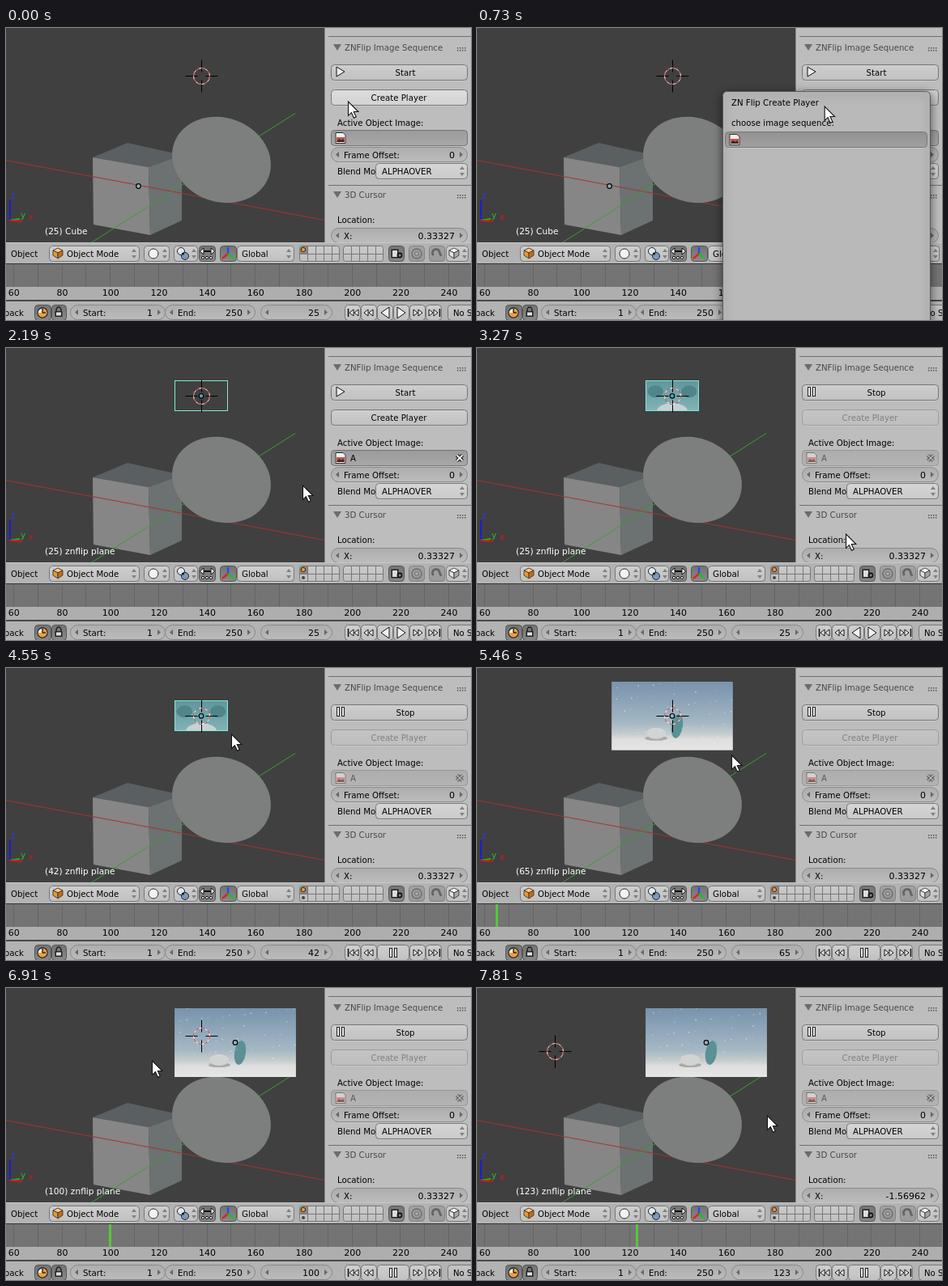
An HTML page with a canvas for the animation above (8000 ms loop, 574x361 px).

```html
<!DOCTYPE html>
<html lang="en">
<head>
<meta charset="utf-8">
<title>Image sequence player</title>
<style>
  html, body { margin: 0; width: 574px; height: 361px; overflow: hidden; background: #404040; }
  canvas { display: block; }
</style>
</head>
<body>
<canvas id="stage" width="574" height="361"></canvas>
<script>
const ctx = document.getElementById('stage').getContext('2d');
const LOOP = 8000, STEPS = 44;
const FONT = '"DejaVu Sans", sans-serif';

// Each key is [step, value, ...]; values in between are linear.
const MOUSE = [[0, 422, 91], [2, 436, 91], [5, 425, 100], [8, 336, 165], [10, 338, 166],
  [12, 366, 170], [15, 440, 56], [16, 442, 55], [18, 455, 230], [20, 477, 340], [21, 478, 342],
  [25, 278, 82], [26, 281, 86], [30, 314, 108], [31, 321, 108], [34, 366, 115], [36, 363, 116],
  [38, 180, 90], [39, 96, 78], [40, 96, 78], [42, 330, 148], [43, 358, 158]];
const FRAME = [[21, 25], [25, 42], [30, 65], [34, 82], [43, 123]];
const SCALE = [[26, 1], [29.5, 2.27]];
const CENTER = [[31, 241, 59.3], [34, 286, 66.5], [36, 283, 67.5]];

function track(keys, s) {
  if (s <= keys[0][0]) return keys[0].slice(1);
  for (let i = 1; i < keys.length; i++) {
    const [a, ...from] = keys[i - 1], [b, ...to] = keys[i];
    if (s <= b) return from.map((v, k) => v + (to[k] - v) * (s - a) / (b - a));
  }
  return keys[keys.length - 1].slice(1);
}

function rect(x, y, w, h, fill) {
  ctx.fillStyle = fill;
  ctx.fillRect(x, y, w, h);
}

function poly(pts, fill, stroke, width = 1) {
  ctx.beginPath();
  for (let i = 0; i < pts.length; i += 2) ctx.lineTo(pts[i], pts[i + 1]);
  ctx.closePath();
  if (fill) { ctx.fillStyle = fill; ctx.fill(); }
  if (stroke) { ctx.strokeStyle = stroke; ctx.lineWidth = width; ctx.stroke(); }
}

function line(x1, y1, x2, y2, color, width = 1) {
  ctx.beginPath();
  ctx.moveTo(x1, y1);
  ctx.lineTo(x2, y2);
  ctx.strokeStyle = color;
  ctx.lineWidth = width;
  ctx.stroke();
}

function oval(x, y, rx, ry, fill, stroke, width = 1, turn = 0) {
  ctx.beginPath();
  ctx.ellipse(x, y, rx, ry, turn, 0, Math.PI * 2);
  if (fill) { ctx.fillStyle = fill; ctx.fill(); }
  if (stroke) { ctx.strokeStyle = stroke; ctx.lineWidth = width; ctx.stroke(); }
}

function text(str, x, y, { color = '#000', align = 'left', size = 10.2 } = {}) {
  ctx.font = size + 'px ' + FONT;
  ctx.textAlign = align;
  ctx.textBaseline = 'alphabetic';
  ctx.fillStyle = color;
  ctx.fillText(str, x, y + 4);
}

const number = (str, x, y, align = 'right') => text(str, x, y, { align, size: 11 });

function box(x, y, w, h, top, bottom = top, r = 4, edge = '#777') {
  const g = ctx.createLinearGradient(0, y, 0, y + h);
  g.addColorStop(0, top);
  g.addColorStop(1, bottom);
  rect(x + r, y + h, w - 2 * r, 1, 'rgba(255,255,255,.2)');
  ctx.beginPath();
  ctx.roundRect(x + 0.5, y + 0.5, w - 1, h - 1, r);
  ctx.fillStyle = g;
  ctx.fill();
  ctx.strokeStyle = edge;
  ctx.lineWidth = 1;
  ctx.stroke();
}

const button = (x, y, w, h = 20, lit) => lit ? box(x, y, w, h, '#dedede', '#d2d2d2') : box(x, y, w, h, '#cfcfcf', '#c0c0c0');
const pressed = (x, y, w, h = 20) => box(x, y, w, h, '#727272', '#8a8a8a', 4, '#555');
const muted = (x, y, w, h = 20) => box(x, y, w, h, '#a2a2a2', '#9a9a9a', 4, '#808080');
const tri = (x, y, w, h, fill, stroke) => poly([x, y - h, x + w, y, x, y + h], fill, stroke);

function updown(x, y) {
  poly([x - 3, y - 2, x, y - 6, x + 3, y - 2], '#808080');
  poly([x - 3, y + 2, x, y + 6, x + 3, y + 2], '#808080');
}

function field(x, y, w, label, value) {
  box(x, y, w, 19, '#adadad', '#bcbcbc', 9, '#8a8a8a');
  tri(x + 10, y + 9.5, -4, 3.5, '#666');
  tri(x + w - 10, y + 9.5, 4, 3.5, '#666');
  text(label, x + 16, y + 9.5);
  number(value, x + w - 16, y + 9.5);
}

function pauseIcon(x, y) {
  for (const dx of [-5, 1]) {
    rect(x + dx, y - 6, 4, 12, '#222');
    rect(x + dx + 1, y - 5, 2, 10, '#eee');
  }
}

function imageIcon(x, y) {
  poly([x - 6, y - 6.5, x + 3, y - 6.5, x + 6, y - 3.5, x + 6, y + 6.5, x - 6, y + 6.5], '#f6f3f0', '#3a2c2c');
  rect(x - 5, y - 1, 10, 6, '#c4554c');
  poly([x - 5, y + 5, x - 2, y + 1, x + 1, y + 3, x + 3, y + 1, x + 5, y + 5], '#33282a');
}

function cubeIcon(x, y, top, left, right) {
  poly([x, y - 6, x + 6, y - 3, x, y, x - 6, y - 3], top, '#444');
  poly([x - 6, y - 3, x, y, x, y + 7, x - 6, y + 3], left, '#444');
  poly([x + 6, y - 3, x, y, x, y + 7, x + 6, y + 3], right, '#444');
}

function film(x, y, w, h, frame) {
  ctx.save();
  ctx.beginPath();
  ctx.rect(x, y, w, h);
  ctx.clip();
  ctx.translate(x, y);
  ctx.scale(w / 150, h / 85);
  const g = ctx.createLinearGradient(0, 0, 0, 85);
  if (frame < 55) {
    g.addColorStop(0, '#5e979d');
    g.addColorStop(1, '#83b3b7');
    rect(0, 0, 150, 85, g);
    oval(28, 30, 22, 17, '#4f858b');
    oval(122, 30, 22, 17, '#4f858b');
    oval(75, 88, 44, 26, '#c6d2d4');
  } else {
    g.addColorStop(0, '#7893ae');
    g.addColorStop(0.6, '#a4b7c3');
    g.addColorStop(0.76, '#c5cccd');
    g.addColorStop(0.84, '#dedede');
    g.addColorStop(1, '#e6e6e5');
    rect(0, 0, 150, 85, g);
    oval(55, 70, 14, 3, '#aaa9a7');
    oval(55, 64, 12, 7, '#d2d4d3');
    oval(81, 55, 7, 15, '#5b9097', null, 1, 0.15);
    for (let i = 0; i < 45; i++) {
      const sx = (i * 61.8 + frame * 0.5) % 150, sy = (i * 37.3 + frame * 1.4) % 72;
      oval(sx, sy, 0.5 + i % 3 * 0.2, 0.5 + i % 3 * 0.2, 'rgba(235,241,245,.55)');
    }
  }
  ctx.restore();
}

function cursor3d(x, y) {
  for (const [dx, dy] of [[1, 0], [-1, 0], [0, 1], [0, -1]])
    line(x + dx * 5, y + dy * 5, x + dx * 20, y + dy * 20, '#000');
  oval(x, y, 10, 10, null, '#f4f4f4');
  ctx.setLineDash([3.93, 3.93]);
  oval(x, y, 10, 10, null, '#e21f1f');
  ctx.setLineDash([]);
}

function viewport(s, frame) {
  rect(0, 0, 393, 265, '#404040');
  poly([107, 160, 150, 142, 217, 157, 176, 172], '#5a6061');
  poly([107, 160, 176, 172, 178, 256, 108, 243], '#868686');
  poly([176, 172, 217, 157, 217, 238, 178, 256], '#6c7171');
  line(0, 163.5, 393, 237.5, '#a83232');
  line(105, 265.5, 357, 105.5, '#38a038');
  oval(266, 163, 62, 52, '#7d7f7f', null, 1, 0.35);

  const made = s >= 11, started = s >= 16;
  const [cx, cy] = track(CENTER, s), [k] = track(SCALE, s);
  const w = 66 * k, h = 37.5 * k;
  if (started) film(cx - w / 2, cy - h / 2, w, h, frame);
  if (made && s < 30) {
    ctx.strokeStyle = '#84e8d4';
    ctx.lineWidth = 1;
    ctx.strokeRect(Math.round(cx - w / 2) + 0.5, Math.round(cy - h / 2) - 0.5, w - 1, Math.round(h) - 1);
  }
  s < 40 ? cursor3d(241.5, 59.5) : cursor3d(96.5, 78.5);
  if (made) oval(cx, cy, 2.8, 2.8, s < 25 ? '#5f9da3' : null, '#000', 1.2);
  else oval(163.5, 195.5, 2.8, 2.8, '#87b7ba', '#000', 1.2);

  line(5, 238, 5, 213, '#1c1cd8', 2);
  line(4, 238, 17, 236, '#22b522', 2);
  line(4, 238, 20, 239, '#d01818', 2);
  text('z', 6, 207, { color: '#3333ff' });
  text('y', 18, 231, { color: '#24c424' });
  text('x', 28, 233, { color: '#d01818' });
  text(`(${frame}) ${made ? 'znflip plane' : 'Cube'}`, 48, 251, { color: '#fff', size: 10.6 });
}

function title(str, y) {
  poly([404, y - 4, 414, y - 4, 409, y + 4], '#6c6c6c');
  text(str, 418, y, { color: '#484848' });
  for (let i = 0; i < 4; i++) {
    rect(557 + i * 3, y, 1.5, 1.5, '#555');
    rect(557 + i * 3, y + 3, 1.5, 1.5, '#555');
  }
}

function panel(s, mx, my) {
  const on = s >= 16, dim = on ? '#808080' : '#000';
  const over = y => mx > 401 && my >= y && my < y + 20;
  rect(393, 0, 181, 265, '#bdbdbd');
  rect(393, 0, 1, 265, '#8d8d8d');
  rect(398, 10, 176, 1, '#6e6e6e');
  title('ZNFlip Image Sequence', 24);

  button(401, 45, 169, 20, over(45));
  on ? pauseIcon(413, 54) : tri(408, 54, 10, 6, '#eee', '#111');
  text(on ? 'Stop' : 'Start', 493, 55, { align: 'center' });
  on ? box(401, 76, 169, 20, '#c4c4c4', '#bebebe', 4, '#9c9c9c') : button(401, 76, 169, 20, s < 4 && over(76));
  text('Create Player', 485, 86, { align: 'center', color: dim });

  text('Active Object Image:', 409, 117);
  box(401, 126, 169, 20, on ? '#adadad' : '#9a9a9a', on ? '#b4b4b4' : '#a9a9a9', 4, on ? '#969696' : '#747474');
  ctx.globalAlpha = on ? 0.5 : 1;
  imageIcon(413, 136);
  if (s >= 11) {
    text('A', 425, 136);
    for (const [color, width] of [['#222', 4.5], ['#eee', 1.8]]) {
      line(556.5, 132.5, 563.5, 139.5, color, width);
      line(563.5, 132.5, 556.5, 139.5, color, width);
    }
  }
  ctx.globalAlpha = 1;
  field(401, 147, 169, 'Frame Offset:', '0');
  text('Blend Mo', 409, 177);
  box(456, 167, 114, 20, '#d6d6d6', '#cacaca');
  text('ALPHAOVER', 464, 177);
  updown(563, 177);

  rect(398, 194, 176, 1, '#6e6e6e');
  title('3D Cursor', 206);
  text('Location:', 409, 237);
  ctx.save();
  ctx.beginPath();
  ctx.rect(393, 240, 181, 25);
  ctx.clip();
  field(401, 247, 169, 'X:', s >= 40 ? '-1.56962' : '0.33327');
  ctx.restore();
}

function header(s) {
  rect(0, 265, 574, 27, '#b3b3b3');
  rect(0, 265, 574, 1, '#c8c8c8');
  if (s > 26 && s < 30) {
    const k = track(SCALE, s)[0].toFixed(4);
    return text(`${k} Y: ${k} Z: ${k}`, 0, 279, { size: 10.6 });
  }
  if (s > 31 && s < 36) {
    const [x, y] = track(CENTER, s), d = Math.hypot(x - 241, y - 59.3);
    const digits = String(Math.round(d * 25.5)).padStart(4, '0');
    return text(`${digits} (${(d * 0.01549).toFixed(4)})`, 0, 279, { size: 10.6 });
  }
  text('Object', 6, 279);
  button(53, 269, 112);
  cubeIcon(64, 278, '#ffc681', '#ef962e', '#c56c13');
  text('Object Mode', 75, 279);
  updown(158, 279);

  button(170, 269, 32);
  oval(182, 279, 6, 6, '#f3f3f3', '#333');
  updown(196, 279);

  button(207, 269, 30);
  oval(216, 276, 4.5, 4.5, '#dfe8f3', '#222');
  oval(221, 282, 4.5, 4.5, '#7b9ac2', '#222');
  oval(218.5, 279, 1.5, 1.5, '#111');
  updown(232, 279);

  pressed(238, 269, 21);
  line(242, 276, 255, 276, '#111', 2);
  poly([244, 272, 239.5, 276, 244, 280], '#fff', '#111');
  poly([253, 272, 257.5, 276, 253, 280], '#fff', '#111');
  for (const x of [243, 248, 253]) oval(x, 284, 1.6, 1.6, '#fff', '#111');

  pressed(264, 269, 21);
  line(274, 279, 274, 271, '#2a4bea', 2.4);
  line(274, 279, 267, 285, '#d22', 2.4);
  line(274, 279, 281, 285, '#2b2', 2.4);
  button(285, 269, 71);
  text('Global', 291, 279);
  updown(349, 279);

  for (const x of [362, 416]) {
    box(x, 269, 50, 20, '#cbcbcb', '#bebebe', 3);
    for (let i = 1; i < 5; i++) line(x + i * 10 + 0.5, 269, x + i * 10 + 0.5, 288, '#777');
    line(x, 279.5, x + 50, 279.5, '#777');
  }
  rect(363, 270, 9, 9, '#878787');
  oval(367, 274, 2.6, 2.6, '#f39b31', '#3a2a11');
  if (s >= 11) oval(367, 284, 2, 2, '#444');

  pressed(472, 269, 20);
  rect(475.5, 273.5, 9, 11, '#222');
  rect(477, 275, 6, 8, '#ddd');
  oval(486, 281, 2.6, 2.6, null, '#111', 1.6);
  muted(497, 269, 20);
  oval(507, 279, 6, 6, null, '#6c6c6c', 1.4);
  oval(507, 279, 2.5, 2.5, '#aaa', '#6c6c6c');
  muted(522, 269, 20);
  ctx.beginPath();
  ctx.arc(531, 278, 4.5, 2.4, 5.5);
  ctx.lineTo(537, 282);
  ctx.strokeStyle = '#666';
  ctx.lineWidth = 3;
  ctx.stroke();
  button(543, 269, 28);
  cubeIcon(553, 278, '#fff', '#e4e4e4', '#aaa');
  updown(566, 279);
}

function timeline(s, frame) {
  const at = f => 9.8 + (f - 60) * 2.985;
  rect(0, 291, 574, 1, '#333');
  rect(0, 292, 574, 28, '#747474');
  rect(0, 320, 574, 16, '#aeaeae');
  for (let f = 60; f <= 240; f += 10) rect(Math.round(at(f)) - 1, 292, 1, 28, '#646464');
  if (frame > 56) rect(Math.round(at(frame)) - 2, 292, 3, 28, '#58c83a');
  for (let f = 60; f <= 240; f += 20) number(f, at(f), 327, 'center');

  rect(0, 336, 574, 2, '#484848');
  rect(0, 338, 574, 23, '#b3b3b3');
  text('oack', -2, 352);
  pressed(35, 342, 21);
  oval(45, 352, 6, 6, '#f5f1e8', '#222', 1.3);
  ctx.beginPath();
  ctx.moveTo(45, 352);
  ctx.arc(45, 352, 5.4, -Math.PI / 2, Math.PI);
  ctx.fillStyle = '#f0a235';
  ctx.fill();
  line(45, 352, 45, 347, '#111', 1.3);
  line(45, 352, 49, 352, '#111', 1.3);
  pressed(56, 342, 19);
  oval(65, 349, 3, 4, null, '#222', 1.5);
  rect(60.5, 350, 9, 7, '#222');
  rect(62, 351.5, 6, 4, '#ddd');

  field(79, 342, 118, 'Start:', '1');
  field(196, 342, 112, 'End:', '250');
  field(314, 342, 89, '', String(frame));

  const playing = s >= 21;
  for (let i = 0; i < 6; i++) {
    if (playing && (i === 2 || i === 3)) continue;
    button(418 + i * 20, 342, 20);
  }
  const arrow = (x, w) => tri(x, 352, w, 4, '#f2f2f2', '#111');
  line(422.5, 347, 422.5, 357, '#111', 1.5);
  for (const x of [429, 435, 447, 453]) arrow(x, -5);
  for (const x of [503, 509, 522, 528]) arrow(x, 5);
  line(535.5, 347, 535.5, 357, '#111', 1.5);
  if (playing) {
    button(458, 342, 40);
    pauseIcon(478, 352);
  } else {
    tri(473, 352, -10, 7, '#f2f2f2', '#111');
    tri(483, 352, 10, 7, '#f2f2f2', '#111');
  }
  box(545, 342, 40, 20, '#c4c4c4', '#b8b8b8');
  text('No S', 552, 352);
}

function popup(s, my) {
  ctx.save();
  ctx.shadowColor = 'rgba(0,0,0,.55)';
  ctx.shadowBlur = 12;
  ctx.shadowOffsetY = 3;
  box(303, 78, 257, 300, '#b9b9b9', '#b9b9b9', 5, '#5a5a5a');
  ctx.restore();
  text('ZN Flip Create Player', 314, 92);
  text('choose image sequence:', 314, 117);
  box(306, 128, 250, 20, '#919191', '#a0a0a0');
  imageIcon(318, 138);
  if (s < 6) return;
  rect(330, 131, 2, 15, '#3b8de0');
  box(303, 149, 257, 230, '#a3a3a3', '#a3a3a3', 4, '#858585');
  const hot = my < 177;
  rect(305, hot ? 157 : 177, 252, 19, '#7a7a7a');
  rect(309, 161, 15, 11, '#3f777c');
  oval(316, 168, 6, 3, '#83b1b3');
  rect(309, 180, 15, 14, '#e8d99a');
  poly([311, 192, 316, 182, 323, 192], '#9fc18a');
  rect(309, 180, 5, 5, '#e6b5c0');
  text('A', 325, 167, { color: hot ? '#fff' : '#000' });
  text('LLL', 325, 187, { color: hot ? '#000' : '#fff' });
}

function pointer(x, y) {
  ctx.save();
  ctx.translate(x + 0.5, y);
  ctx.scale(1.08, 1.08);
  poly([0, 0, 0, 16, 3.6, 12.6, 6.4, 18.8, 9, 17.6, 6.3, 11.6, 11.5, 11.6], '#fff', '#111');
  ctx.restore();
}

function draw(ms) {
  const s = Math.min(STEPS - 1, Math.floor((ms % LOOP + 15) * STEPS / LOOP));
  const frame = Math.round(track(FRAME, s)[0]);
  const [mx, my] = track(MOUSE, s);
  viewport(s, frame);
  panel(s, mx, my);
  header(s);
  timeline(s, frame);
  if (s >= 4 && s < 11) popup(s, my);
  pointer(mx, my);
}

const begin = performance.now();
function tick() {
  draw(performance.now() - begin);
  requestAnimationFrame(tick);
}
tick();
</script>
</body>
</html>
```
